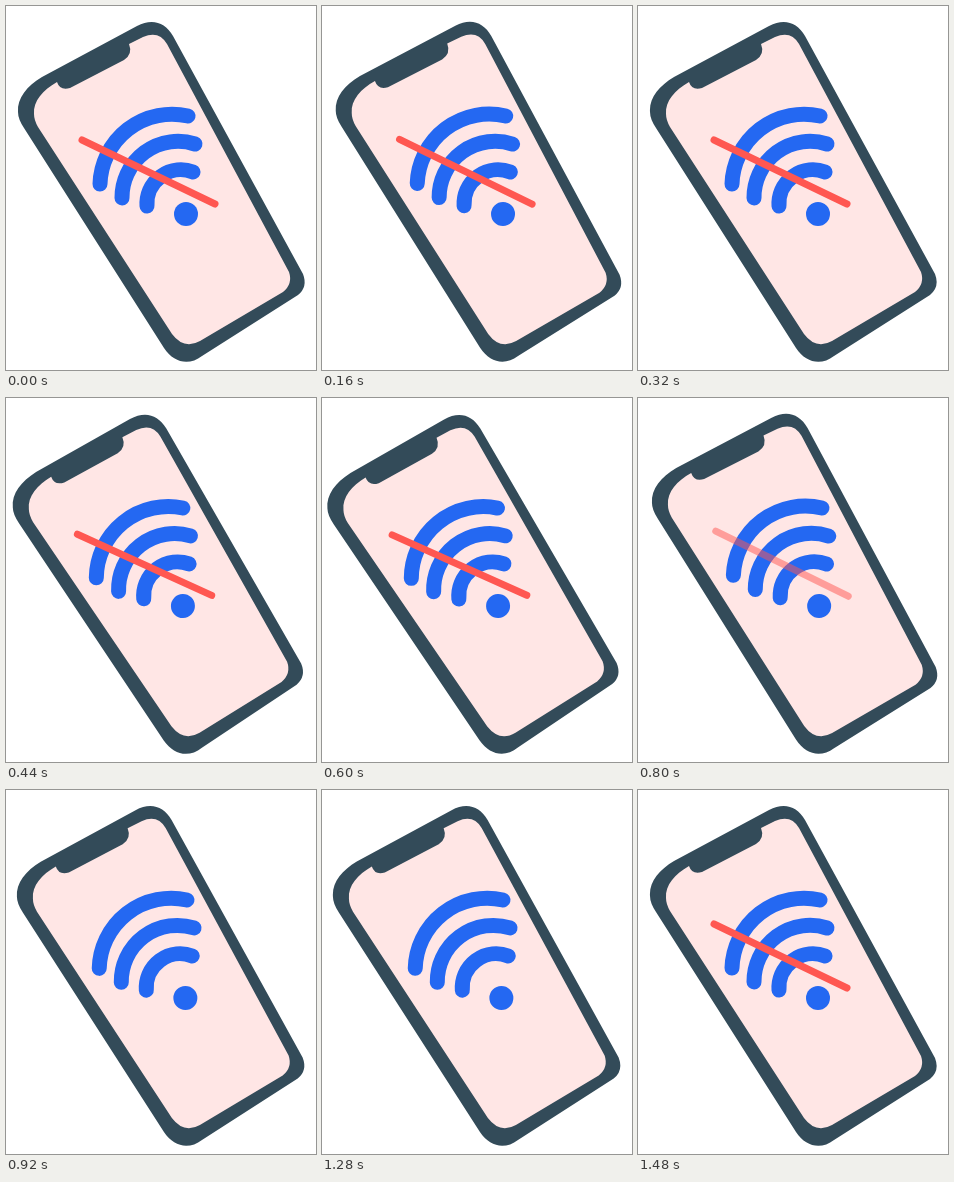
An HTML page that plays this animation: 310x364 px, repeating every 2 s.

```html
<!DOCTYPE html>
<html lang="en">
<head>
<meta charset="utf-8">
<title>Phone without signal</title>
<style>
  html, body { margin: 0; width: 100%; height: 100%; overflow: hidden; background: #fff; }
  svg { display: block; width: 100%; height: 100%; }
  .wifi { fill: none; stroke: #2468f2; stroke-width: 15; stroke-linecap: round; }
</style>
</head>
<body>
<svg viewBox="0 0 310 364">
  <g id="phone">
    <path fill="#334b59" d="M12 106C11 92 21 80 36 71L131 20C146 12 159 16 167 30L297 268Q302 281 292 289L196 350C183 360 168 357 158 342L18 122Q12 113 12 106Z"/>
    <path fill="#ffe6e5" d="M28 108C27 95 37 84 51 76Q54 85 64 82L118 54Q127 48 123 38L137 31Q153 24 161 38L283 266Q287 278 277 286L194 335Q178 344 166 328L32 121Q28 114 28 108Z"/>
    <g class="wifi">
      <path d="M94 178A72 72 0 0 1 182 110"/>
      <path d="M116 192A56 56 0 0 1 189 138"/>
      <path d="M141 200A34 34 0 0 1 187 166"/>
    </g>
    <circle cx="180" cy="208" r="12" fill="#2468f2"/>
    <path id="slash" d="M76 134L209 198" stroke="#ff5751" stroke-width="7" stroke-linecap="round"/>
  </g>
</svg>
<script>
  const LOOP = 2000, STEP = 40;
  const phone = document.getElementById('phone');
  const slash = document.getElementById('slash');

  // Keys are [time in ms, value].
  const tilt = [[0, 0], [160, 0.4], [590, -1.53], [800, 0.45], [920, -0.25], [1240, -0.25], [1480, 0], [LOOP, 0]];
  const opacity = [[0, 1], [680, 1], [920, 0], [1280, 0], [1480, 1], [LOOP, 1]];

  const linear = u => u;
  const easeInOut = u => u < 0.5 ? 4 * u ** 3 : 1 - 4 * (1 - u) ** 3;

  function valueAt(keys, t, ease) {
    const next = keys.findIndex(key => key[0] > t);
    const [t0, v0] = keys[next - 1], [t1, v1] = keys[next];
    return v0 + (v1 - v0) * ease((t - t0) / (t1 - t0));
  }

  function draw(now) {
    const t = Math.floor(now % LOOP / STEP) * STEP;
    phone.setAttribute('transform', `rotate(${valueAt(tilt, t, easeInOut)} 180 355)`);
    slash.setAttribute('opacity', valueAt(opacity, t, linear));
  }

  const start = performance.now();
  function tick() {
    draw(performance.now() - start);
    requestAnimationFrame(tick);
  }
  tick();
</script>
</body>
</html>
```
